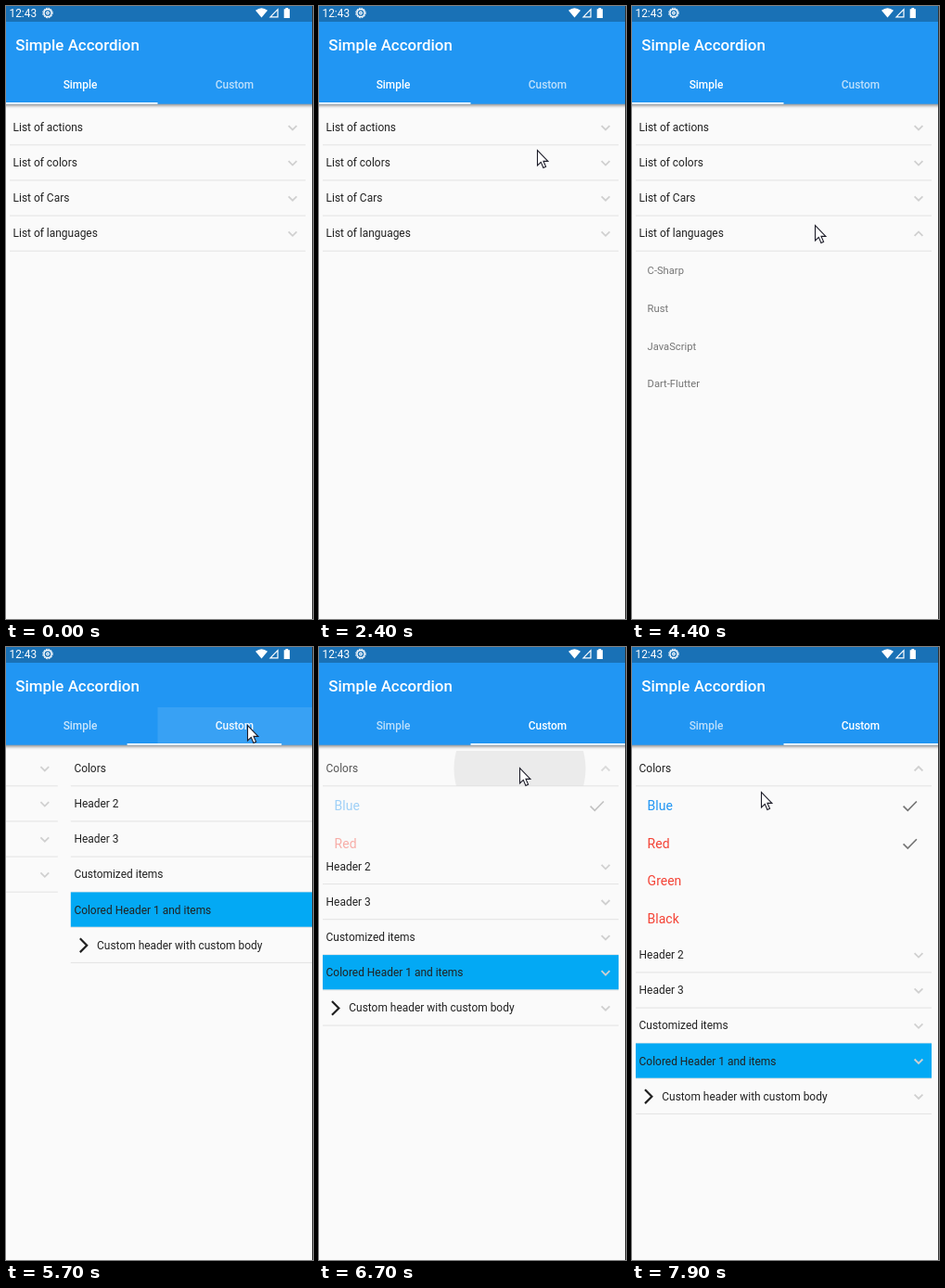
These frames come from a looping animation (331x661 px, 8 s). An HTML page:

```html
<!DOCTYPE html>
<html lang="en">
<head>
<meta charset="utf-8">
<title>Simple Accordion</title>
<style>
html, body { margin: 0; width: 100%; height: 100%; overflow: hidden; background: #fafafa; }
svg { display: block; overflow: hidden; }
text { font-family: Roboto, sans-serif; fill: #212121; white-space: pre; }
.bar text { fill: #fff; }
.tab { font-size: 11.9px; font-weight: 500; text-anchor: middle; }
.head { font-size: 11.95px; }
.chevron, .check { fill: none; stroke: #d0d0d0; stroke-width: 1.8; }
.check { stroke: #757575; stroke-width: 1.7; }
</style>
</head>
<body>
<svg id="stage" width="331" height="661" viewBox="0 0 331 661">
  <rect width="331" height="661" fill="#fafafa"/>
  <g id="simple"></g>
  <g id="custom"></g>
  <g class="bar">
    <rect x="-9" y="-9" width="349" height="114.7" fill="#2196f3" style="filter:drop-shadow(0 2px 1.8px rgba(0,0,0,.4))"/>
    <rect width="331" height="17" fill="#1971b6"/>
    <text x="3.5" y="12.2" font-size="11.9">12:43</text>
    <g fill="none" stroke="#fff" transform="translate(45 7.5)">
      <circle r="4.1" stroke-width="1.5"/>
      <circle r="5.3" stroke-width="1" stroke-dasharray="1.7 1.07"/>
      <circle r="1.3" stroke-width="1.2"/>
    </g>
    <path d="M275.5 12.5 269 4.7Q275.5 -.3 282 4.7Z" fill="#fff"/>
    <path d="M293 3.6V11.8H285Z" fill="none" stroke="#fff" stroke-width="1.2"/>
    <path d="M299.7 3.2h1.7v-1.2h2.8v1.2h1.7v9.8h-6.2Z" fill="#fff"/>
    <text x="10.3" y="48" font-size="16.9" font-weight="500">Simple Accordion</text>
    <rect id="glow" x="163.5" y="65" width="167" height="40.7" fill="#fff"/>
    <text id="tab0" class="tab" x="80" y="89">Simple</text>
    <text id="tab1" class="tab" x="246.5" y="89">Custom</text>
    <rect id="marker" y="104" width="166.5" height="1.7" fill="#fff"/>
  </g>
  <rect x="330" width="1" height="661" fill="#333"/>
  <path id="cursor" d="M.5 .6V17L4.3 13.4 6.9 19.4 9.6 18.2 7 12.4H11.9Z" fill="#fff" stroke="#1c1c28" stroke-width="1.1"/>
</svg>
<script>
const LOOP = 8000, STEP = 100, HEAD = 38.1, ITEM = 40.75, PAGE = 333, TOGGLE = 195;
const $ = id => document.getElementById(id);
const clamp = v => Math.max(0, Math.min(1, v));

function add(parent, tag, attrs, content) {
  const el = document.createElementNS('http://www.w3.org/2000/svg', tag);
  for (const k in attrs) el.setAttribute(k, attrs[k]);
  if (content) el.textContent = content;
  return parent.appendChild(el);
}

// clicks: times at which the header is toggled; tapX: where its ripple starts
function section(page, title, { items = [], clicks = [], tapX = 0, fill, icon } = {}) {
  const root = add(page, 'g');
  if (fill) add(root, 'rect', { x: 4, width: 319, height: HEAD - .6, fill });
  const ink = add(root, 'svg', { x: 8, width: 307, height: HEAD });
  const ripple = add(ink, 'circle', { cx: tapX - 8, cy: HEAD / 2, r: 0 });
  add(root, 'rect', { x: 4, y: HEAD - .7, width: 319, height: .9, fill: '#e0e0e0' });
  const head = add(root, 'g');
  if (icon) add(head, 'path', { d: 'M14 11.8 21.4 19.2 14 26.6', fill: 'none', stroke: '#212121', 'stroke-width': 2.2 });
  add(head, 'text', { class: 'head', x: icon ? 32.3 : 7.6, y: 23.2 }, title);
  const chevron = add(head, 'path', { class: 'chevron', d: 'M-4.4 -2.2 0 2.2 4.4 -2.2' });
  const body = add(root, 'svg', { y: HEAD, width: 331, height: 0 });
  const checks = items.map(({ text, color, checkedAt }, i) => {
    const mid = (i + .5) * ITEM + .5, size = color ? 14 : 11.2;
    add(body, 'text', { x: 16.6, y: mid + size * .345, 'font-size': size, style: `fill:${color || '#757575'}` }, text);
    if (checkedAt === undefined) return null;
    const el = add(body, 'path', { class: 'check', d: `M292.6 ${mid + .6}l4.7 4.7 9.6 -9.8` });
    return { el, checkedAt };
  }).filter(Boolean);

  return (t, y) => {
    let open = 0, run = 1, up = false;
    clicks.forEach((at, i) => {
      if (t < at) return;
      run = clamp((t - at) / TOGGLE);
      up = i % 2 === 0;
      open = up ? run : 1 - run;
    });
    const height = items.length * ITEM * open;
    root.setAttribute('transform', `translate(0 ${y})`);
    head.setAttribute('opacity', 1 - open * (1 - open));
    chevron.setAttribute('transform', `translate(309 19.3) scale(1 ${up ? -1 : 1})`);
    ripple.setAttribute('r', run < 1 ? 171 * run : 0);
    ripple.setAttribute('opacity', .1 * (1 - run));
    body.setAttribute('height', height);
    body.setAttribute('opacity', open);
    for (const c of checks) c.el.setAttribute('opacity', t >= c.checkedAt ? 1 : 0);
    return y + HEAD + height;
  };
}

const list = (...names) => names.map(text => ({ text }));
const red = '#f44336';
const simple = $('simple'), custom = $('custom');
const pages = [[
  section(simple, 'List of actions', { items: list('First Item Of List', 'Second Item Of List', 'Third Item Of List'), clicks: [1455, 2205], tapX: 193 }),
  section(simple, 'List of colors'),
  section(simple, 'List of Cars', { items: list('Sedan'), clicks: [3050, 3580], tapX: 209 }),
  section(simple, 'List of languages', { items: list('C-Sharp', 'Rust', 'JavaScript', 'Dart-Flutter'), clicks: [4000, 4850], tapX: 198 })
], [
  section(custom, 'Colors', { items: [
    { text: 'Blue', color: '#2196f3', checkedAt: 0 },
    { text: 'Red', color: red, checkedAt: 7700 },
    { text: 'Green', color: red },
    { text: 'Black', color: red }
  ], clicks: [6619], tapX: 216.5 }),
  section(custom, 'Header 2'),
  section(custom, 'Header 3'),
  section(custom, 'Customized items'),
  section(custom, 'Colored Header 1 and items', { fill: '#03a9f4' }),
  section(custom, 'Custom header with custom body', { icon: true })
]];

// pointer path: time, x, y
const path = [
  [960, 334, 330], [1400, 193, 132], [1680, 193, 132], [1800, 243, 131], [1900, 238, 131],
  [2250, 238, 131], [2400, 235, 155], [2550, 235, 155], [2900, 209, 201], [3580, 209, 202],
  [3800, 199, 229], [4050, 199, 229], [4200, 197, 235], [4350, 197, 235], [4400, 197, 236],
  [4950, 197, 236], [5400, 260, 84], [6050, 260, 84], [6450, 216, 130], [6950, 216, 130],
  [7100, 139, 171], [7250, 139, 171], [7500, 127, 203], [7650, 127, 203], [7900, 139, 156]
];

function pointer(t) {
  const i = path.findIndex(p => p[0] > t);
  if (i < 0) return path[path.length - 1].slice(1);
  if (i === 0) return [-50, -50];
  const [a, b] = [path[i - 1], path[i]], k = (t - a[0]) / (b[0] - a[0]), s = k * k * (3 - 2 * k);
  return [1, 2].map(j => a[j] + (b[j] - a[j]) * s);
}

// cubic-bezier(.25, .1, .25, 1)
function ease(x) {
  const bez = (a, b, u) => 3 * a * u * (1 - u) ** 2 + 3 * b * u * u * (1 - u) + u ** 3;
  let lo = 0, hi = 1;
  for (let i = 0; i < 20; i++) {
    const mid = (lo + hi) / 2;
    if (bez(.25, .25, mid) < x) lo = mid; else hi = mid;
  }
  return bez(.1, 1, lo);
}

function draw(t) {
  for (const page of pages) page.reduce((y, place) => place(t, y), 112);
  const slide = ease(clamp((t - 5550) / 300));
  simple.setAttribute('transform', `translate(${-PAGE * slide} 0)`);
  custom.setAttribute('transform', `translate(${PAGE * (1 - slide)} 0)`);
  $('marker').setAttribute('x', -3 + 166.5 * slide);
  $('tab0').setAttribute('opacity', 1 - .3 * slide);
  $('tab1').setAttribute('opacity', .7 + .3 * slide);
  $('glow').setAttribute('opacity', t < 5550 ? 0 : .1 * clamp((5900 - t) / 200));
  $('cursor').setAttribute('transform', `translate(${pointer(t)})`);
}

const start = performance.now();
function tick(now) {
  const t = Math.max(0, now - start) % LOOP;
  draw(Math.floor(t / STEP) * STEP);
  requestAnimationFrame(tick);
}
draw(0);
requestAnimationFrame(tick);
</script>
</body>
</html>
```
